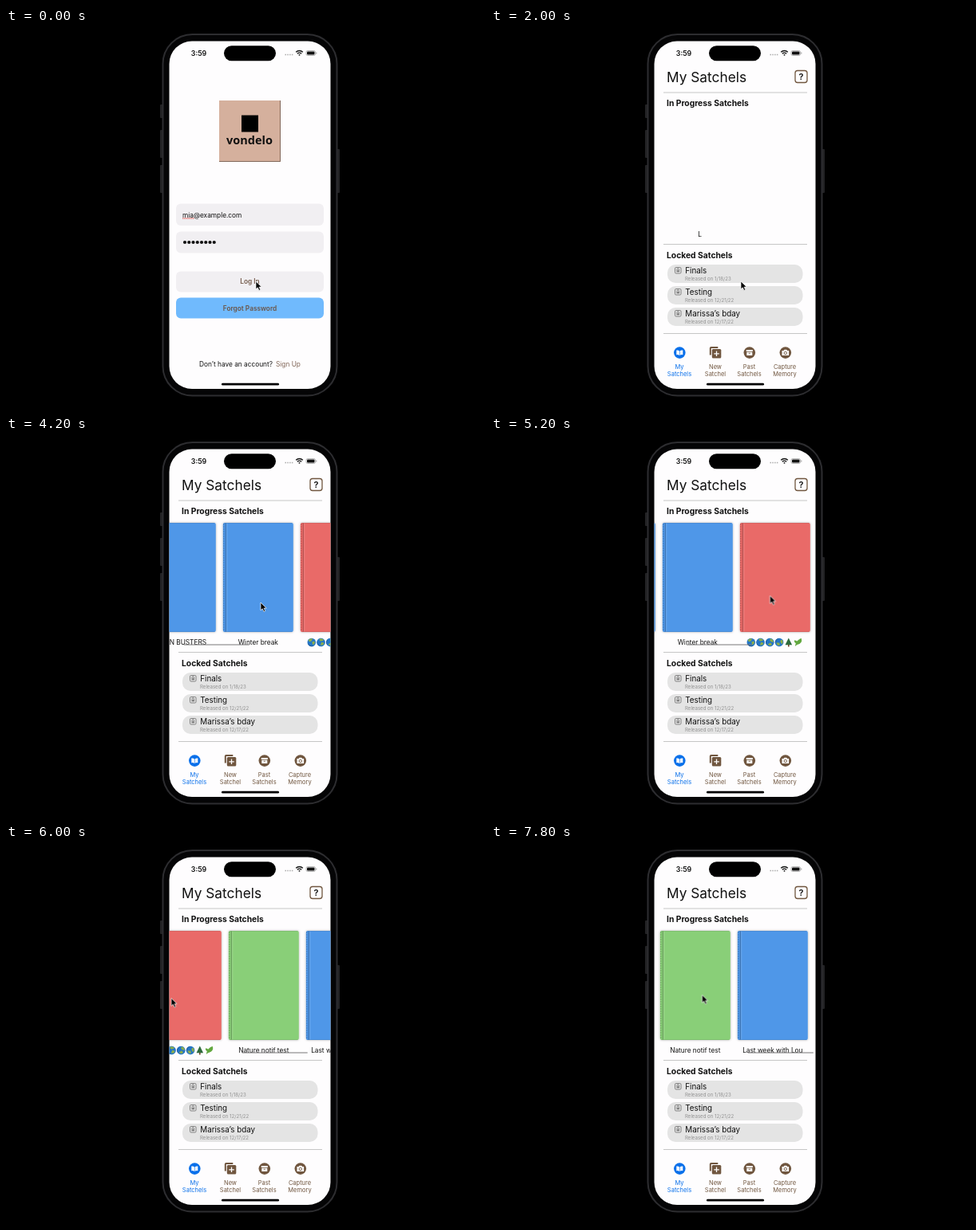
These frames come from a looping animation (600x477 px, 8 s). An HTML page:

```html
<!DOCTYPE html>
<html lang="en">
<head>
<meta charset="utf-8">
<title>App walkthrough</title>
<style>
  @property --off { syntax: '<length>'; inherits: true; initial-value: 0px; }
  html, body { margin: 0; width: 100%; height: 100%; overflow: hidden; background: #000; }
  svg { display: block; width: 600px; height: 477px; font-family: Inter, Roboto, sans-serif; font-size: 8.3px; fill: #111; }
  .mid { text-anchor: middle; }
  .semi { font-weight: 600; }
  .head { font-weight: 700; font-size: 10.3px; }
  .item { font-size: 9.8px; }
  .tiny { font-size: 6.1px; fill: #929292; }
  .tab { font-size: 7.5px; text-anchor: middle; fill: #70563f; }
  .rule { stroke: #c6c6c6; stroke-width: 1; }
  .field { fill: #f1eff2; }

  .anim { animation: 8s infinite step-end; }
  .login { animation-name: login; }
  .home { animation-name: home; }
  .books { animation-name: books; }
  .wait { animation-name: wait; }
  .up { animation-name: up; }
  .down { animation-name: down; }
  .busy { animation-name: busy; }
  .label { animation-name: dim; }
  .bar { animation-name: bar; }
  @keyframes login { 0% { visibility: visible } 22.5%, 100% { visibility: hidden } }
  @keyframes home { 0% { visibility: hidden } 22.5%, 100% { visibility: visible } }
  @keyframes wait { 0% { visibility: hidden } 22.5% { visibility: visible } 30%, 100% { visibility: hidden } }
  @keyframes books { 0% { visibility: hidden } 30%, 100% { visibility: visible } }
  @keyframes bar { 0% { opacity: 0 } 50%, 100% { opacity: 1 } }
  @keyframes up { 0% { transform: none } 2.5%, 100% { transform: translateY(-9px) } }
  @keyframes down { 0% { transform: none } 2.5%, 100% { transform: translateY(9px) } }
  @keyframes busy { 0% { opacity: 0 } 2.5%, 100% { opacity: 1 } }
  @keyframes dim { 0% { fill: #765d4e } 2.5%, 100% { fill: #b9b5b5 } }

  .spin { animation: spin .8s steps(4) infinite; }
  @keyframes spin { to { transform: rotate(360deg) } }

  .scroll { animation: scroll 8s infinite; }
  .row { transform: translateX(calc(-1 * var(--off))); }
  .thumb { transform: translateX(calc(.39 * var(--off))); }
  @keyframes scroll {
    0% { --off: 0px; animation-timing-function: step-end }
    47.5% { --off: 0px; animation-timing-function: steps(2) }
    52.5% { --off: 43px; animation-timing-function: steps(1) }
    55% { --off: 68px; animation-timing-function: steps(2) }
    60% { --off: 94px; animation-timing-function: steps(2) }
    65% { --off: 100px; animation-timing-function: steps(1) }
    67.5% { --off: 111px; animation-timing-function: steps(3) }
    75% { --off: 230px; animation-timing-function: steps(4) }
    85% { --off: 254px; animation-timing-function: steps(5) }
    97.5%, 100% { --off: 297px }
  }

  .cursor { animation: cursor 8s infinite; }
  @keyframes cursor {
    0% { transform: translate(313px, 318px); animation-timing-function: step-end }
    37.5% { transform: translate(313px, 318px); animation-timing-function: steps(4) }
    47.5% { transform: translate(362px, 212px); animation-timing-function: steps(2) }
    52.5% { transform: translate(319px, 209px); animation-timing-function: steps(1) }
    55% { transform: translate(300px, 207px); animation-timing-function: steps(4) }
    65% { transform: translate(349.500px, 200.500px); animation-timing-function: steps(1) }
    67.5% { transform: translate(340px, 200px); animation-timing-function: steps(3) }
    75% { transform: translate(207px, 193.500px); animation-timing-function: steps(4) }
    85% { transform: translate(320px, 192px); animation-timing-function: steps(5) }
    97.5%, 100% { transform: translate(264.500px, 189.500px) }
  }
</style>
</head>
<body>
<svg viewBox="0 0 600 477">
  <defs>
    <clipPath id="clip"><rect id="screen" x="204.500" y="16.500" width="202" height="436.500" rx="28.500"/></clipPath>
    <filter id="soft" x="-10%" y="-10%" width="120%" height="120%">
      <feDropShadow dx="0" dy="0" stdDeviation="1.600" flood-opacity=".3"/>
    </filter>
    <g id="book">
      <rect y="109" width="88" height="137" rx="2" filter="url(#soft)"/>
      <path d="M1 110V245" stroke="#000" stroke-opacity=".3" stroke-width=".7" stroke-dasharray="2 1"/>
      <path d="M3.500 109.500V245.500" stroke="#000" stroke-opacity=".35" stroke-width=".8"/>
      <path d="M5 109.500V245.500" stroke="#fff" stroke-opacity=".25" stroke-width=".7"/>
      <path d="M1 109.400H87M1 245.600H87" stroke="#000" stroke-opacity=".12" stroke-width=".7"/>
    </g>
    <g id="globe">
      <circle r="5.300" fill="#2475c6"/>
      <path d="M-3.600-3.400Q-1-5.400 1.400-4.200L.2-2.200-1.600-.8-3.800-1.400ZM.4-.6L3.600-1.600 4.200 1 1.600 3.600Z" fill="#8bae4b"/>
      <path d="M-5 1A5.300 5.300 0 0 0 3 4.300 7 7 0 0 1-5 1Z" fill="#123e78"/>
    </g>
    <g id="lock" fill="none" stroke="#777" stroke-width=".9">
      <rect x="230.500" y="300.500" width="7.500" height="7.500" rx="1.300"/>
      <path d="M233 304V303a1.200 1.200 0 0 1 2.400 0V304"/>
      <path d="M232.400 304.200h3.700v2.100h-3.700z" fill="#777" stroke="none"/>
    </g>
    <rect id="pill" x="221" y="297" width="169.500" height="23" rx="10" fill="#e4e4e4"/>
  </defs>

  <g fill="#232325">
    <rect x="193" y="96" width="4" height="17" rx="1"/>
    <rect x="193" y="128" width="4" height="35" rx="1"/>
    <rect x="193" y="172" width="4" height="35" rx="1"/>
    <rect x="414" y="152" width="4" height="55" rx="1"/>
  </g>
  <rect x="196.500" y="8" width="218" height="453.500" rx="37" fill="#050506" stroke="#2d2d30" stroke-width="2"/>
  <use href="#screen" fill="#fefdfe"/>

  <g clip-path="url(#clip)">
    <g class="anim login">
      <rect x="267" y="91" width="77" height="77" fill="#d5b09d"/>
      <path d="M343.500 91V167.500H267" fill="none" stroke="#6d5649" stroke-width=".8"/>
      <rect x="295" y="109.500" width="21" height="21" fill="#000"/>
      <text x="305" y="146" class="mid" font-family="'Noto Sans', 'Open Sans', sans-serif" font-weight="600" font-size="14.500">vondelo</text>

      <g class="anim up">
        <rect class="field" x="213" y="220.500" width="185" height="27.500" rx="6"/>
        <text x="221" y="237.500">mia@example.com</text>
        <path d="M221 239H236" stroke="#e2473f" stroke-width="1.100" stroke-dasharray="1.500 .6"/>
        <rect class="field" x="213" y="255.500" width="185" height="27" rx="6"/>
        <g id="dots"></g>
        <rect class="field" x="213" y="305.500" width="185" height="26" rx="6"/>
        <text x="305.500" y="321.300" class="mid semi anim label">Log In</text>
      </g>
      <g transform="translate(306 335)">
        <g class="anim busy"><g class="spin" id="spokes" stroke="#555" stroke-width="1.200" stroke-linecap="round"></g></g>
      </g>
      <g class="anim down">
        <rect x="213" y="338.500" width="185" height="26" rx="6" fill="#70bafd"/>
        <text x="305.500" y="354.500" class="mid semi" fill="#6b5548">Forgot Password</text>
      </g>
      <text x="242" y="425">Don’t have an account?</text>
      <text x="338" y="425" fill="#806657">Sign Up</text>
    </g>

    <g class="anim home">
      <text x="220" y="68" font-size="17.300">My Satchels</text>
      <rect x="381" y="53.500" width="15" height="15" rx="3" fill="none" stroke="#70563f" stroke-width="1.300"/>
      <text x="388.500" y="65" class="mid semi" font-size="11">?</text>
      <path class="rule" d="M216 81H396M216 271.500H396M216 383.500H396"/>
      <text x="220" y="98.200" class="head">In Progress Satchels</text>
      <text x="220" y="288.700" class="head">Locked Satchels</text>

      <use href="#pill"/><use href="#lock"/>
      <use href="#pill" y="27"/><use href="#lock" y="27"/>
      <use href="#pill" y="54"/><use href="#lock" y="54"/>
      <text x="243.300" y="308.300" class="item">Finals</text>
      <text x="243" y="316.800" class="tiny">Released on 1/18/23</text>
      <text x="243.300" y="335.300" class="item">Testing</text>
      <text x="243" y="343.800" class="tiny">Released on 12/21/22</text>
      <text x="243.300" y="362.300" class="item">Marissa’s bday</text>
      <text x="243" y="370.800" class="tiny">Released on 12/17/22</text>

      <g transform="translate(.3 -.4)">
        <circle cx="236" cy="408" r="7.300" fill="#0a70ea"/>
        <path d="M232 405Q234 404.300 235.700 405.800V411.300Q234 410 232 410.700ZM240 405Q238 404.300 236.300 405.800V411.300Q238 410 240 410.700Z" fill="#fff"/>
        <path d="M274.500 411V402.500Q274.500 401.500 275.500 401.500H284" fill="none" stroke="#70563f" stroke-width="2"/>
        <rect x="276.500" y="403.500" width="11.500" height="11.500" rx="1.500" fill="#70563f"/>
        <path d="M282.200 406V412.500M279 409.200H285.500" stroke="#fff" stroke-width="1.300"/>
        <circle cx="323.500" cy="408" r="7.300" fill="#70563f"/>
        <path d="M319.500 404.500h8v2h-8zM320 407.200h7v4.300h-7z" fill="#fff"/>
        <path d="M322.300 408.700h2.400" stroke="#70563f" stroke-width=".8"/>
        <circle cx="368.500" cy="408" r="7.300" fill="#70563f"/>
        <path d="M364.200 405.500h2l1-1.300h2.600l1 1.300h2v6h-8.600z" fill="#fff"/>
        <circle cx="368.500" cy="408.400" r="1.700" fill="none" stroke="#70563f" stroke-width=".9"/>
      </g>
      <g class="tab">
        <text x="236" y="427.500" fill="#0a70ea">My</text><text x="236" y="437" fill="#0a70ea">Satchels</text>
        <text x="281" y="427.500">New</text><text x="281" y="437">Satchel</text>
        <text x="323.500" y="427.500">Past</text><text x="323.500" y="437">Satchels</text>
        <text x="368" y="427.500">Capture</text><text x="368" y="437">Memory</text>
      </g>
    </g>

    <text x="261.500" y="262" class="mid anim wait">L</text>
    <g class="anim books">
      <g class="scroll">
        <g class="row" id="row"></g>
        <g class="anim bar"><path class="thumb" d="M206 262H288" stroke="#777" stroke-width="1.200"/></g>
      </g>
    </g>
  </g>

  <text x="231.800" y="34.700" class="semi" font-size="8.800">3:59</text>
  <rect x="273" y="22.300" width="65" height="19" rx="9.500" fill="#000"/>
  <path d="M349.500 33.500H359.500" stroke="#aaa" stroke-width="1.500" stroke-dasharray="1.500 1.300"/>
  <g fill="none" stroke="#111" stroke-width="1.300">
    <path d="M363.200 30.300a6 6 0 0 1 8.600 0M364.900 32.300a3.600 3.600 0 0 1 5.200 0"/>
    <path d="M366.700 33.800h1.600" stroke-width="1.600"/>
  </g>
  <rect x="376" y="28.500" width="11.500" height="6" rx="1.800" fill="none" stroke="#999" stroke-width=".7"/>
  <rect x="377" y="29.400" width="9.500" height="4.200" rx="1"/>
  <path d="M388.800 30.500v2" stroke="#999"/>
  <rect x="270" y="445.800" width="72" height="2.700" rx="1.350" fill="#000"/>

  <path class="cursor" d="M0 0V9.800L2.300 7.800 3.900 11.400 5.700 10.600 4.100 7.100H7.200Z" fill="#000" stroke="#fff" stroke-width=".7"/>
</svg>
<script>
  const byId = id => document.getElementById(id);
  const repeat = (n, draw) => Array.from({ length: n }, (_, i) => draw(i)).join('');

  byId('dots').innerHTML = repeat(8, i => `<circle cx="${224 + i * 5.25}" cy="269" r="2.1"/>`);
  byId('spokes').innerHTML = repeat(8, i =>
    `<path d="M0-2.200V-4.700" transform="rotate(${i * 45})" opacity="${0.25 + i * 0.08}"/>`);

  const globes = repeat(4, i => `<use href="#globe" transform="translate(${14 + i * 11.75} 259) rotate(${i * 35})"/>`)
    + '<path d="M61 253.500l4.300 8.800h-8.600z" fill="#2f6a3c"/><path d="M61 262v2.500" stroke="#70452a" stroke-width="1.600"/>'
    + '<path d="M69 264Q70 256 77 254 79 260.500 71.500 262ZM68 256.500q4-.5 4 4-4 0-4-4Z" fill="#62a83f"/>';
  const blue = '#4f97e8';
  const shelf = [
    [blue, 'LINEN BUSTERS'],
    [blue, 'Winter break'],
    ['#e96a68', ''],
    ['#89cf78', 'Nature notif test'],
    [blue, 'Last week with Lou']
  ];
  byId('row').innerHTML = shelf.map(([color, name], i) =>
    `<g transform="translate(${217.8 + i * 97} 0)"><use href="#book" fill="${color}"/>`
    + (name ? `<text x="44" y="262" class="mid">${name}</text>` : globes) + '</g>').join('');
</script>
</body>
</html>
```
